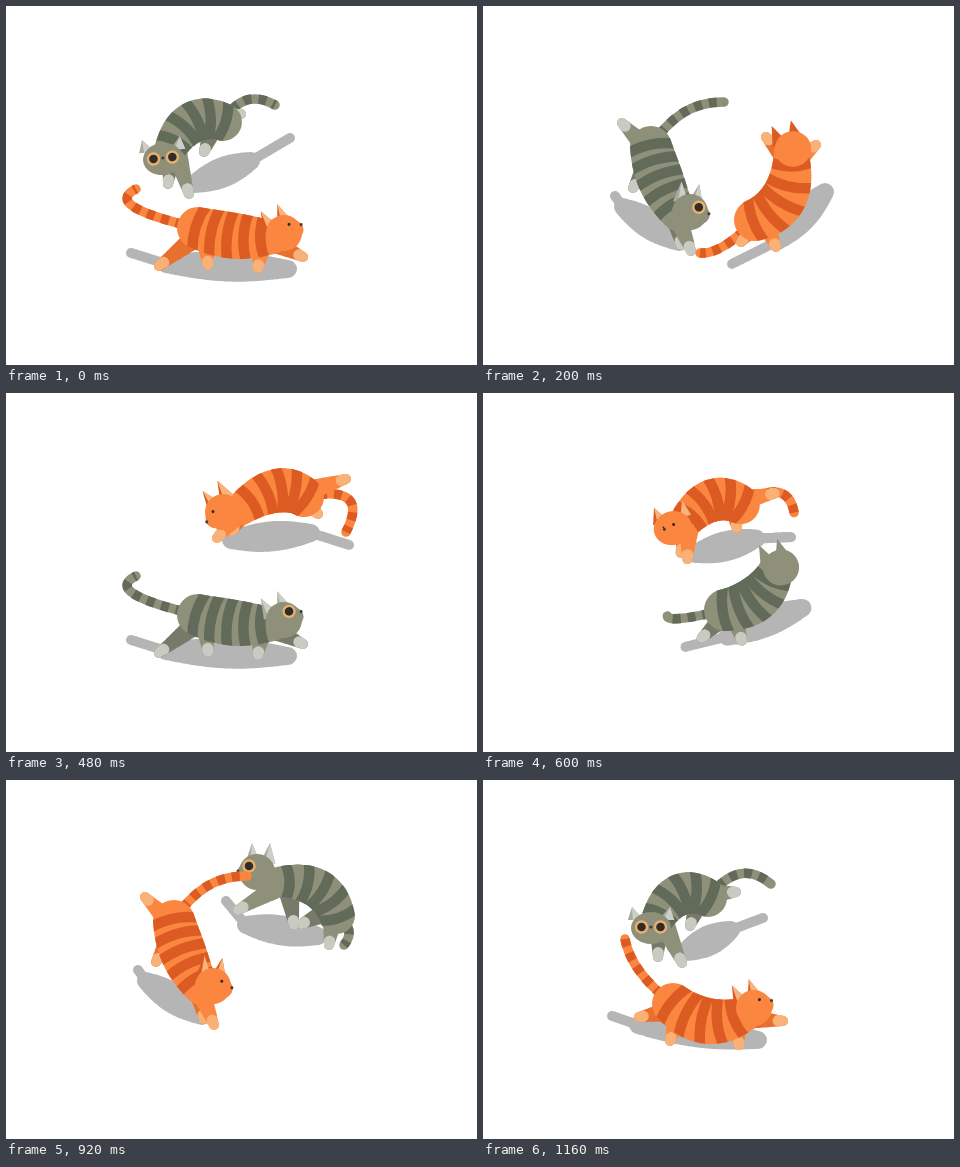
Write an HTML page with a canvas that moves like this. It is 471x359 px and loops after 1.24 s.

```html
<!DOCTYPE html>
<html>
<head>
<meta charset="utf-8">
<style>
html, body { margin: 0; width: 100%; height: 100%; overflow: hidden; background: #fff }
canvas { display: block }
</style>
</head>
<body>
<canvas id="stage" width="471" height="359"></canvas>
<script>
const c = document.getElementById('stage').getContext('2d');
const LOOP = 1240, HOLD = 20;
const steps = [0, 40, 120, 200, 280, 320, 400, 480, 520, 600, 640, 720, 840, 880, 920, 1040, 1160];

// Both cats run the same round; the orange one is ahead by its lead.
const grey = { lead: 0, base: '#8e907a', dark: '#626b5a', far: '#777a68', paw: '#c9cac1', ear: '#cdcec7', earSide: '#a9ab9c', earBack: '#8e907a', bigEyes: true };
const orange = { lead: 480, base: '#fb863f', dark: '#db5b22', far: '#e8702f', paw: '#f8b278', ear: '#f8b47c', earSide: '#db5b22', earBack: '#db5b22' };

// spine: rump, control, neck; tail: control, tip; head: x, y, tilt, turn (-1 left, 0 front, 1 right), face visible;
// paws: back and front far, back and front near; shade: two ends and tail tip.
const keys = [];
function key(t, fat, spine, tail, head, paws, shade) {
  keys.push({ t, fat: [fat], spine, tail, head, paws, shade });
}
key(0, .9, [217, 116, 181, 103, 163, 146], [237, 81, 269, 99], [157, 153, -.1, 0, 1],
  [198, 146, 162, 178, 235, 108, 183, 188], [245, 155, 188, 178, 284, 132]);
key(180, 1, [168, 141, 175, 176, 195, 208], [196, 95, 241, 96], [207, 206, .15, 1, 1],
  [150, 182, 198, 239, 139, 117, 208, 245], [140, 201, 196, 236, 132, 190]);
key(320, .95, [184, 177, 199, 213, 230, 228], [161, 138, 198, 109], [243, 224, 0, 1, 1],
  [176, 214, 246, 242, 158, 168, 227, 249], [148, 231, 220, 242, 154, 190]);
key(400, 1, [190, 224, 224, 253, 262, 234], [148, 192, 142, 159], [271, 228, -.35, 1, 1],
  [156, 237, 300, 241, 187, 261, 256, 265], [155, 245, 275, 260, 129, 236]);
key(480, 1, [192, 222, 227, 233, 266, 231], [96, 200, 130, 183], [278, 227, -.4, 1, 1],
  [153, 260, 297, 251, 202, 259, 252, 262], [160, 258, 282, 263, 125, 247]);
key(680, 1, [272, 214, 313, 200, 308, 146], [238, 249, 217, 247], [310, 143, -.3, .9, 0],
  [258, 236, 283, 131, 293, 241, 333, 139], [295, 235, 342, 186, 249, 258]);
key(720, 1.05, [275, 210, 318, 201, 314, 148], [239, 222, 221, 206], [314, 143, -.35, .9, 0],
  [256, 235, 330, 140, 293, 242, 332, 138], [290, 240, 342, 190, 238, 253]);
key(800, .9, [303, 186, 326, 157, 297, 120], [285, 210, 280, 222], [291, 116, -.15, -.9, 0],
  [300, 195, 294, 154, 300, 196, 286, 151], [290, 190, 316, 204, 262, 156]);
key(920, .85, [331, 136, 320, 97, 270, 102], [351, 149, 338, 165], [251, 92, 0, -1, 1],
  [295, 144, 288, 145, 323, 165, 232, 130], [240, 145, 312, 156, 220, 121]);
key(960, .95, [298, 104, 273, 86, 235, 116], [365, 90, 340, 139], [217, 119, -.6, -1, 1],
  [312, 121, 226, 138, 340, 86, 211, 145], [305, 140, 225, 147, 343, 152]);
key(1180, .9, [225, 118, 191, 100, 172, 145], [256, 77, 288, 104], [168, 148, 0, 0, 1],
  [207, 146, 175, 177, 253, 112, 199, 183], [248, 150, 202, 172, 280, 138]);

// Each key is held briefly, then blends into the next.
function poseAt(t) {
  let i = keys.length - 1;
  while (keys[i].t > t) i--;
  const a = keys[i], b = keys[(i + 1) % keys.length];
  const gap = (b.t - a.t + LOOP) % LOOP;
  const f = Math.max(0, Math.min(1, (t - a.t - HOLD) / Math.max(1, gap - 2 * HOLD)));
  const p = {};
  for (const name in a) if (name !== 't') p[name] = a[name].map((v, k) => v + (b[name][k] - v) * f);
  return p;
}

const bend = (a, m, b, u) => (1 - u) * (1 - u) * a + 2 * u * (1 - u) * m + u * u * b;
const along = ([x0, y0, x1, y1, x2, y2], u) => [bend(x0, x1, x2, u), bend(y0, y1, y2, u)];
const line = (x0, y0, x1, y1) => [x0, y0, (x0 + x1) / 2, (y0 + y1) / 2, x1, y1];
const girth = (u, fat) => fat * (21 + 4 * Math.sin(Math.PI * u) - 4 * u);

// A tube of circles along a curve, with a radius that depends on u.
function tube(curve, radius, from = 0) {
  const path = new Path2D();
  for (let i = 0; i <= 50; i++) {
    const u = from + (1 - from) * i / 50, [x, y] = along(curve, u), r = radius(u);
    path.moveTo(x + r, y);
    path.arc(x, y, r, 0, 7);
  }
  return path;
}

function fill(path, color) {
  c.fillStyle = color;
  c.fill(path);
}

function oval(x, y, rx, ry, color) {
  const path = new Path2D();
  path.ellipse(x, y, rx, ry, 0, 0, 7);
  fill(path, color);
}

function triangle(x0, y0, x1, y1, x2, y2, color) {
  fill(new Path2D(`M${x0} ${y0}L${x1} ${y1}L${x2} ${y2}Z`), color);
}

function drawShade({ shade: [x0, y0, x1, y1, x2, y2] }) {
  fill(tube(line(x0, y0, x1, y1), u => 9 + 6 * Math.sin(Math.PI * u)), '#b5b5b5');
  fill(tube(line(x0, y0, x2, y2), () => 5), '#b5b5b5');
}

function drawTail(cat, { spine: [x, y], tail }) {
  const path = new Path2D(`M${x} ${y}Q${tail}`);
  c.lineWidth = 9.5;
  c.lineCap = 'round';
  c.strokeStyle = cat.base;
  c.stroke(path);
  c.lineCap = 'butt';
  c.setLineDash([8, 7]);
  c.strokeStyle = cat.dark;
  c.stroke(path);
  c.setLineDash([]);
}

function drawLegs(cat, { spine, paws }) {
  for (let i = 0; i < 4; i++) {
    const curve = line(...along(spine, i % 2 ? .88 : .1), paws[2 * i], paws[2 * i + 1]);
    const radius = u => 12 - 7 * u;
    fill(tube(curve, radius), i < 2 ? cat.far : cat.base);
    fill(tube(curve, radius, .9), cat.paw);
  }
}

function drawBody(cat, { spine, fat: [fat] }) {
  const body = tube(spine, u => girth(u, fat));
  fill(body, cat.base);
  c.save();
  c.clip(body);
  c.lineWidth = 10.5;
  c.strokeStyle = cat.dark;
  for (let k = 0; k < 5; k++) {
    const u = .02 + .22 * k, [x, y] = along(spine, u), [x2, y2] = along(spine, u + .01);
    const d = Math.hypot(x2 - x, y2 - y), tx = (x2 - x) / d, ty = (y2 - y) / d, r = girth(u, fat) * 1.15;
    c.beginPath();
    c.moveTo(x - ty * r, y + tx * r);
    c.quadraticCurveTo(x - tx * 8, y - ty * 8, x + ty * r, y - tx * r);
    c.stroke();
  }
  c.restore();
}

function drawHead(cat, { head: [x, y, tilt, turn, face] }) {
  const side = Math.abs(turn), front = 1 - side, seen = face > .5;
  c.save();
  c.translate(x, y);
  c.rotate(tilt);
  for (const s of [-1, 1]) {
    const ex = s * (9 + 10 * front) - 4 * turn, bx = ex * .8, top = -21 - 8 * side;
    triangle(bx - 8, -8, ex, top, bx + 8, -8, seen ? cat.earSide : cat.earBack);
    if (seen) triangle(bx - 3, -8, ex, top, bx + 8, -8, cat.ear);
  }
  oval(0, 0, 18 + 2 * front, 16 + 2 * side, cat.base);
  if (seen) {
    oval(turn * 11, 1, 9, 9, cat.base);
    for (const [s, size] of [[1, 1], [-1, front]]) {
      const ex = turn * 8 + s * front * 9.5, ey = -1 - 5 * side;
      if (cat.bigEyes) oval(ex, ey, 6.7 * size, 6.7 * size, '#e9b06d');
      const r = (cat.bigEyes ? 4.3 : 1.5) * size;
      oval(ex, ey, r, r, '#302c29');
    }
    oval(turn * 19, -1, 1.5, 1.5, '#453a32');
  }
  c.restore();
}

function frame() {
  const now = performance.now() % LOOP;
  const t = steps.filter(s => s <= now).pop();
  c.fillStyle = '#fff';
  c.fillRect(0, 0, 471, 359);
  const cats = [grey, orange].map(cat => ({ cat, p: poseAt((t + cat.lead) % LOOP) }));
  cats.sort((a, b) => a.p.spine[3] - b.p.spine[3]);
  cats.forEach(({ p }) => drawShade(p));
  for (const { cat, p } of cats) [drawTail, drawLegs, drawBody, drawHead].forEach(draw => draw(cat, p));
  requestAnimationFrame(frame);
}
frame();
</script>
</body>
</html>
```
